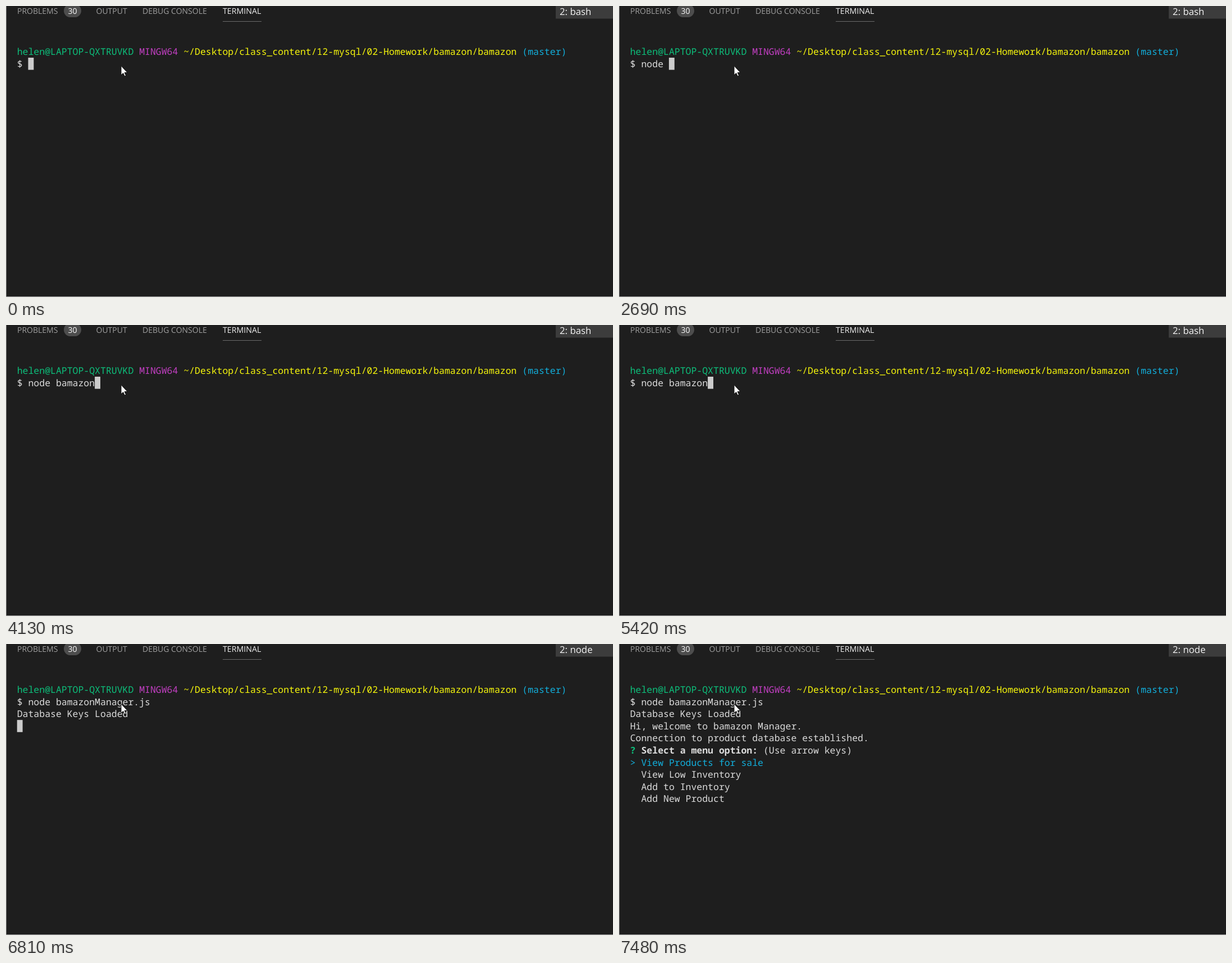
Animation, 1081 px wide and 518 px high, one loop 8000 ms. Source, as an HTML page with a canvas:

```html
<!DOCTYPE html>
<html lang="en">
<head>
<meta charset="utf-8">
<title>Terminal session</title>
<style>
  html, body { margin: 0; width: 100%; height: 100%; overflow: hidden; background: #1e1e1e; }
  canvas { display: block; }
</style>
</head>
<body>
<canvas width="1081" height="518"></canvas>
<script>
const ctx = document.querySelector('canvas').getContext('2d');
const LOOP = 8000, LEFT = 19.7, TOP = 70.4, COL = 9.886, ROW = 21.6;
const MONO = '16.48px "Noto Sans Mono", monospace';
const SANS = '"Open Sans", "Noto Sans", sans-serif';
const GREEN = '#0dbf7b', MAGENTA = '#c23fc2', YELLOW = '#f6f60c', CYAN = '#12aedb', WHITE = '#dcdcdc';

// Command line contents by time
const typing = [
  [0, ''], [510, 'n'], [630, 'nod'], [750, 'node'], [2690, 'node '], [3540, 'node ba'],
  [4130, 'node bamazon'], [5020, 'node bamazonM'], [5420, 'node bamazon'],
  [5540, 'node bamazonM'], [5950, 'node bamazonManager.js ']
];
const RUN = 6650, MENU = 7480;

// Program output: time, row, column, text, colour, weight
const output = [
  [6810, 2, 0, 'Database Keys Loaded', WHITE],
  [7060, 3, 0, 'Hi, welcome to bamazon Manager.', WHITE],
  [7060, 4, 0, 'Connection to product database established.', WHITE],
  [MENU, 5, 0, '?', GREEN, 700],
  [MENU, 5, 2, 'Select a menu option:', WHITE, 700],
  [MENU, 5, 24, '(Use arrow keys)', WHITE],
  [MENU, 6, 0, '> View Products for sale', CYAN],
  [MENU, 7, 2, 'View Low Inventory', WHITE],
  [MENU, 8, 2, 'Add to Inventory', WHITE],
  [MENU, 9, 2, 'Add New Product', WHITE]
];

function rect(x, y, w, h, color) {
  ctx.fillStyle = color;
  ctx.fillRect(x, y, w, h);
}

function label(text, x, y, size, color) {
  ctx.font = `${size}px ${SANS}`;
  ctx.fillStyle = color;
  ctx.fillText(text, x, y);
}

// Each character sits in its own terminal cell
function print(row, col, text, color, weight = 500) {
  ctx.font = `${weight} ${MONO}`;
  ctx.fillStyle = color;
  const y = Math.round(87 + row * ROW);
  [...text].forEach((ch, i) => ctx.fillText(ch, LEFT + (col + i) * COL, y));
}

function caret(row, col) {
  rect(LEFT + col * COL, TOP + row * ROW, COL, ROW, '#cccccc');
}

function header(running) {
  label('PROBLEMS', 20, 14, 14, '#a0a0a0');
  label('OUTPUT', 160.5, 14, 14, '#a0a0a0');
  label('DEBUG CONSOLE', 243, 14, 14, '#a0a0a0');
  label('TERMINAL', 386, 14, 14.2, '#f0f0f0');
  rect(386, 27, 69, 1, '#6a6a6a');
  ctx.fillStyle = '#4d4d4d';
  ctx.beginPath();
  ctx.roundRect(103, -3, 31, 23, 11.5);
  ctx.fill();
  label('30', 110.5, 14, 14, '#ffffff');
  rect(979, 0, 102, 22.5, '#3c3c3c');
  label(running ? '2: node' : '2: bash', 986, 16, 16.8, '#f5f5f5');
}

function pointer() {
  const p = new Path2D('M205 106.5v16.5l3.7-3.5 2.5 5.5 2.4-1-2.5-5.4h5z');
  ctx.fillStyle = '#fff';
  ctx.fill(p);
  ctx.strokeStyle = '#111';
  ctx.lineWidth = 1;
  ctx.stroke(p);
}

function draw(t) {
  rect(0, 0, 1081, 518, '#1e1e1e');
  header(t >= RUN);

  print(0, 0, 'helen@LAPTOP-QXTRUVKD', GREEN);
  print(0, 22, 'MINGW64', MAGENTA);
  print(0, 30, '~/Desktop/class_content/12-mysql/02-Homework/bamazon/bamazon', YELLOW);
  print(0, 91, '(master)', CYAN);

  const command = typing.findLast(([at]) => t >= at)[1];
  print(1, 0, '$ ' + command, WHITE);
  const shown = output.filter(([at]) => t >= at);
  for (const [, ...line] of shown) print(...line);

  if (t < RUN) caret(1, 2 + command.length);
  else if (t < MENU) caret(2 + shown.length, 0);

  pointer();
  rect(0, 0, 1, 518, '#808080');
  rect(0, 517, 1081, 1, '#a0a0a0');
}

ctx.textRendering = 'geometricPrecision';
const start = performance.now();
function tick() {
  draw((performance.now() - start) % LOOP);
  requestAnimationFrame(tick);
}
tick();
</script>
</body>
</html>
```
